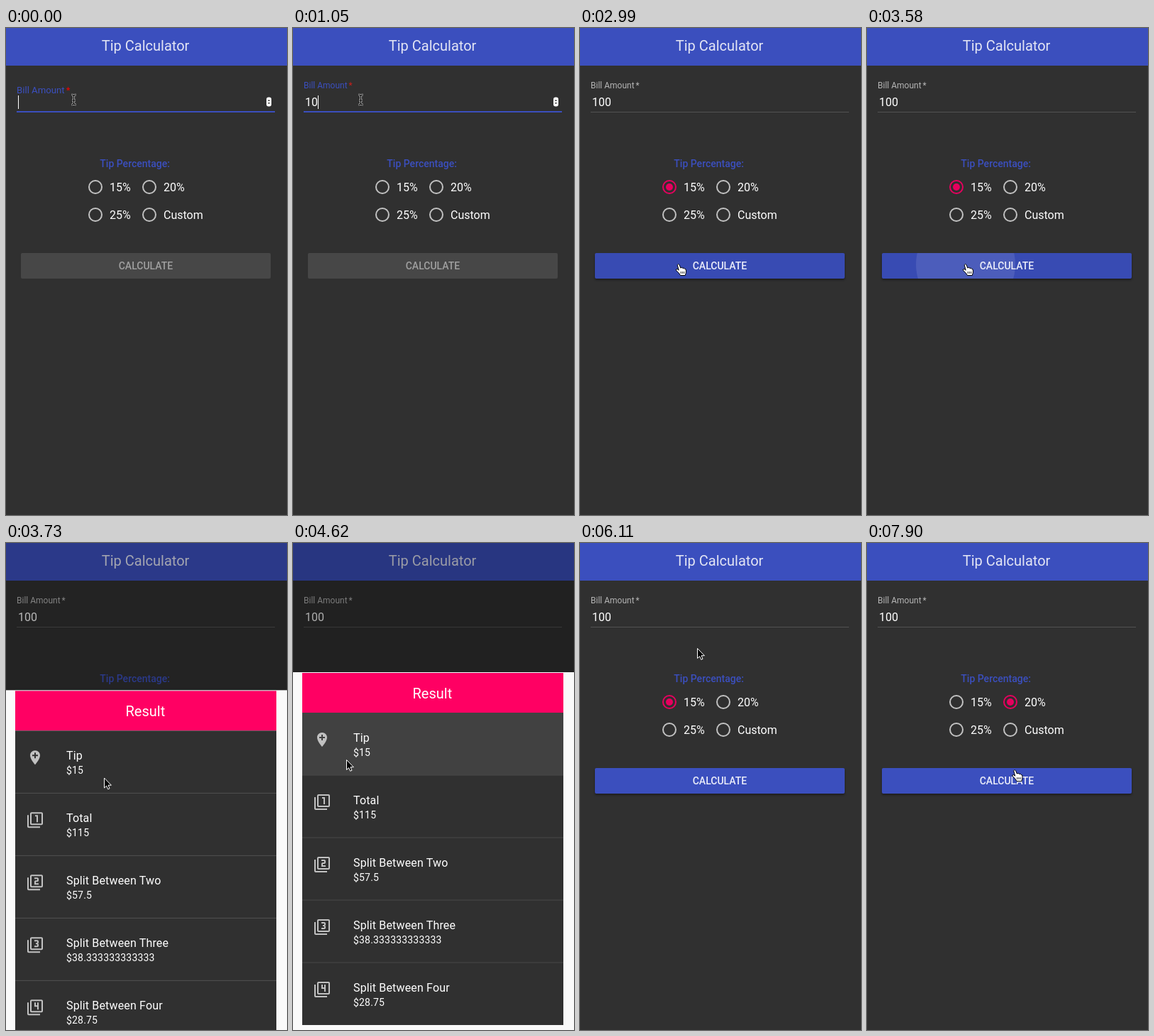
An HTML page that plays this animation: 396 px wide and 686 px high, repeating every 8 s.

```html
<!DOCTYPE html>
<html lang="en">
<head>
<meta charset="utf-8">
<title>Tip Calculator</title>
<style>
html, body { margin: 0; width: 100%; height: 100%; overflow: hidden; background: #303030; }
svg { display: block; width: 100%; height: 100%; font: 16px Roboto, sans-serif; fill: #fff; }
.strong { font-size: 14px; font-weight: 500; }
.big { font-size: 20px; }
.rowTitle { letter-spacing: .15px; }
.rowValue { font-size: 14px; letter-spacing: .18px; }
.icon { fill: #c1c1c1; }
.raised { filter: drop-shadow(0 2px 1.5px rgba(0, 0, 0, .4)); }
</style>
</head>
<body>
<svg viewBox="0 0 396 686">
  <rect width="396" height="686" fill="#303030"/>
  <rect width="396" height="53" fill="#3b4fbe"/>
  <text class="big" x="134.8" y="32" fill="#e3e5f4">Tip Calculator</text>

  <text id="label" x="15">Bill Amount<tspan id="star" dx="2">*</tspan></text>
  <text id="amount" x="17" y="110"></text>
  <rect id="caret" y="95" width="1" height="19"/>
  <g id="spinner">
    <rect x="367" y="97.5" width="7" height="13" rx="3"/>
    <path d="M368.8 103l1.7-2.2 1.7 2.2zM368.8 105l1.7 2.2 1.7-2.2z" fill="#444"/>
  </g>
  <rect x="15" y="118" width="364" height="1" fill="#525252"/>
  <rect id="underline" x="15" y="117" width="364" height="2" fill="#3b4fbe"/>

  <text class="strong" x="132.3" y="196" fill="#3b4fbe">Tip Percentage:</text>
  <g id="radios"></g>

  <rect id="button" x="21" y="317" width="352" height="36" rx="2"/>
  <clipPath id="buttonClip"><rect x="21" y="317" width="352" height="36" rx="2"/></clipPath>
  <circle id="press" cx="139" cy="333" r="70" clip-path="url(#buttonClip)" opacity=".1"/>
  <text id="buttonText" class="strong" x="197" y="340" text-anchor="middle">CALCULATE</text>

  <rect id="backdrop" width="396" height="686" fill="#000"/>
  <g id="sheet">
    <rect y="-1" width="396" height="504" fill="#fafafa"/>
    <rect x="13" width="368" height="56" fill="#ff0063"/>
    <text class="big" x="168.5" y="35.5">Result</text>
    <g id="rows"></g>
  </g>

  <g id="cursor">
    <g id="beam" fill="none">
      <path id="beamLine" d="M-3-7Q0-7 0-5V5Q0 7-3 7M3-7Q0-7 0-5M0 5Q0 7 3 7M-2.5 1H2.5" stroke="#bbb" stroke-width="2.6"/>
      <use href="#beamLine" style="stroke:#000"/>
      <path d="M-3-7Q0-7 0-5V5Q0 7-3 7M3-7Q0-7 0-5M0 5Q0 7 3 7M-2.5 1H2.5" stroke="#000" stroke-width="1.2"/>
    </g>
    <path id="arrow" d="M.5.5V14.5L3.6 11.6 5.7 16.3 8 15.3 6 10.7H10.4Z" fill="#000" stroke="#fff"/>
    <g id="hand" stroke="#000">
      <path d="M-1.8 1.8Q-.5-.5 1 1.5L2.8 6Q4.8 4.6 6 6.4Q8 5.6 8.7 7.4Q10.6 7 10.5 10Q10.6 13 9.3 16.5H2.5Q1 13-3.2 9.8Q-4.6 7.4-2 7.5L.2 9.2Z"/>
      <path d="M3.2 11V14M5.4 11V14M7.6 11V14" stroke-width=".8"/>
    </g>
  </g>
</svg>
<script>
const LOOP = 8000, TICK = 149;
const PINK = '#e6005e', BLUE = '#3b4fbe';
const $ = id => document.getElementById(id);
const set = (el, attrs) => { for (const a in attrs) el.setAttribute(a, attrs[a]); };
const show = (id, on) => $(id).style.display = on ? '' : 'none';
const clamp = v => Math.min(1, Math.max(0, v));

// Radio buttons
const options = ['15%', '20%', '25%', 'Custom'];
$('radios').innerHTML = options.map((name, i) => {
  const x = 126 + i % 2 * 76, y = 224 + (i >> 1) * 39;
  return `<g transform="translate(${x} ${y})"><circle fill="${PINK}" opacity=".2"/>
    <circle r="9" fill="none" stroke-width="2"/><circle fill="${PINK}"/>
    <text x="20" y="6">${name}</text></g>`;
}).join('');

// Result rows
const frame = 'M3 5H1v16c0 1.1.9 2 2 2h16v-2H3zM21 1H7c-1.1 0-2 .9-2 2v14c0 1.1.9 2 2 2h14c1.1 0 2-.9 2-2V3c0-1.1-.9-2-2-2zm0 16H7V3h14z';
const rows = [
  ['Tip', '$15', 'M12 2C8.14 2 5 5.14 5 9c0 5.25 7 13 7 13s7-7.75 7-13c0-3.86-3.14-7-7-7zm4 8h-3v3h-2v-3H8V8h3V5h2v3h3z'],
  ['Total', '$115', frame + 'M14 15h2V5h-4v2h2z'],
  ['Split Between Two', '$57.5', frame + 'M17 13h-4v-2h2c1.1 0 2-.89 2-2V7c0-1.11-.9-2-2-2h-4v2h4v2h-2c-1.1 0-2 .89-2 2v4h6z'],
  ['Split Between Three', '$38.333333333333', frame + 'M17 13v-1.5c0-.83-.67-1.5-1.5-1.5.83 0 1.5-.67 1.5-1.5V7c0-1.11-.9-2-2-2h-4v2h4v2h-2v2h2v2h-4v2h4c1.1 0 2-.89 2-2z'],
  ['Split Between Four', '$28.75', frame + 'M15 15h2V5h-2v4h-2V5h-2v6h4z']
];
$('rows').innerHTML = rows.map(([title, value, icon], i) => `<g transform="translate(13 ${56 + i * 88})">
  <rect width="368" height="88" fill="#303030"/>
  ${i ? '<rect y="-.5" width="368" height="1" fill="#494949"/>' : ''}
  <path class="icon" fill-rule="evenodd" transform="translate(16 26)" d="${icon}"/>
  <text class="rowTitle" x="72" y="40.5">${title}</text>
  <text class="rowValue" x="72" y="60.5">${value}</text></g>`).join('');
const tipRow = $('rows').querySelector('rect');

// Pointer path: tick, shape, x, y
const path = [
  [0, 'beam', 95.5, 101], [11, 'arrow', 118, 150], [12, 'arrow', 150, 205],
  [13, 'hand', 160, 238], [14, 'hand', 136, 231], [15, 'hand', 128, 223],
  [19, 'arrow', 134, 290], [20, 'hand', 139, 332], [25, 'arrow', 138, 330.5],
  [30, 'arrow', 115, 322], [31, 'arrow', 75, 305], [32, 'arrow', 37, 285],
  [33, 'arrow', 60, 240], [34, 'arrow', 120, 185], [35, 'arrow', 165, 148],
  [42, 'arrow', 168, 160], [43, 'arrow', 173, 176], [44, 'arrow', 179, 192],
  [45, 'arrow', 184, 204], [46, 'hand', 189, 216], [47, 'hand', 208, 227],
  [52, 'arrow', 211, 285], [53, 'hand', 208.5, 319]
];

function drawField(k) {
  const focused = k < 17, lift = 1.2 * .1 ** k;
  const typed = '100'.slice(0, Math.max(0, k - 5));
  set($('label'), { y: 85 + 6 * lift, 'font-size': 12 + lift, fill: focused ? BLUE : '#b4b4b4' });
  set($('star'), { fill: !focused ? '#b4b4b4' : k ? '#c4201c' : '#f00000' });
  $('amount').textContent = typed;
  set($('caret'), { x: 17 + typed.length * 9 });
  show('caret', k < 3 || k > 5 && k < 11);
  show('spinner', focused);
  set($('underline'), { opacity: focused ? 1 : k < 18 ? .4 : 0 });
}

function drawRadios(k) {
  [...$('radios').children].forEach((g, i) => {
    const picked = i === 0 ? 17 : i === 1 ? 51 : Infinity;
    const on = k >= picked && !(i === 0 && k >= 51), age = k - picked;
    const [ripple, ring, dot] = g.children;
    set(ripple, { r: on && age < 2 ? 9 + 6 * age : 0 });
    set(ring, { stroke: on ? PINK : '#c1c1c1' });
    set(dot, { r: on ? Math.min(5, 3 + age) : 0 });
  });
}

function drawButton(k) {
  const enabled = k >= 17, hover = k >= 20 && k < 39;
  set($('button'), { fill: !enabled ? '#474747' : hover ? '#384bb3' : BLUE, class: enabled ? 'raised' : '' });
  set($('buttonText'), { fill: enabled ? '#eceefa' : '#a0a0a0' });
  show('press', k === 24);
}

function drawSheet(k) {
  const ms = k * TICK;
  const enter = (1 - clamp((ms - 3602) / 195)) ** 3;
  const leave = clamp((ms - 39 * TICK) / 270) ** 2;
  show('sheet', k >= 25 && k < 41);
  set($('sheet'), { transform: `translate(0 ${183 + 503 * (enter + leave)})` });
  set(tipRow, { fill: k >= 26 ? '#414141' : '#303030' });
  set($('backdrop'), { opacity: k < 25 || k >= 39 ? 0 : k === 25 ? .28 : .32 });
}

function drawCursor(k) {
  const [, shape, x, y] = path.filter(p => p[0] <= k).pop();
  for (const id of ['beam', 'arrow', 'hand']) show(id, id === shape);
  set($('cursor'), { transform: `translate(${x} ${y})` });
}

function draw(now) {
  const k = Math.floor((now % LOOP + 8) / TICK);
  for (const part of [drawField, drawRadios, drawButton, drawSheet, drawCursor]) part(k);
}

const start = performance.now();
function loop() {
  draw(performance.now() - start);
  requestAnimationFrame(loop);
}
loop();
</script>
</body>
</html>
```
